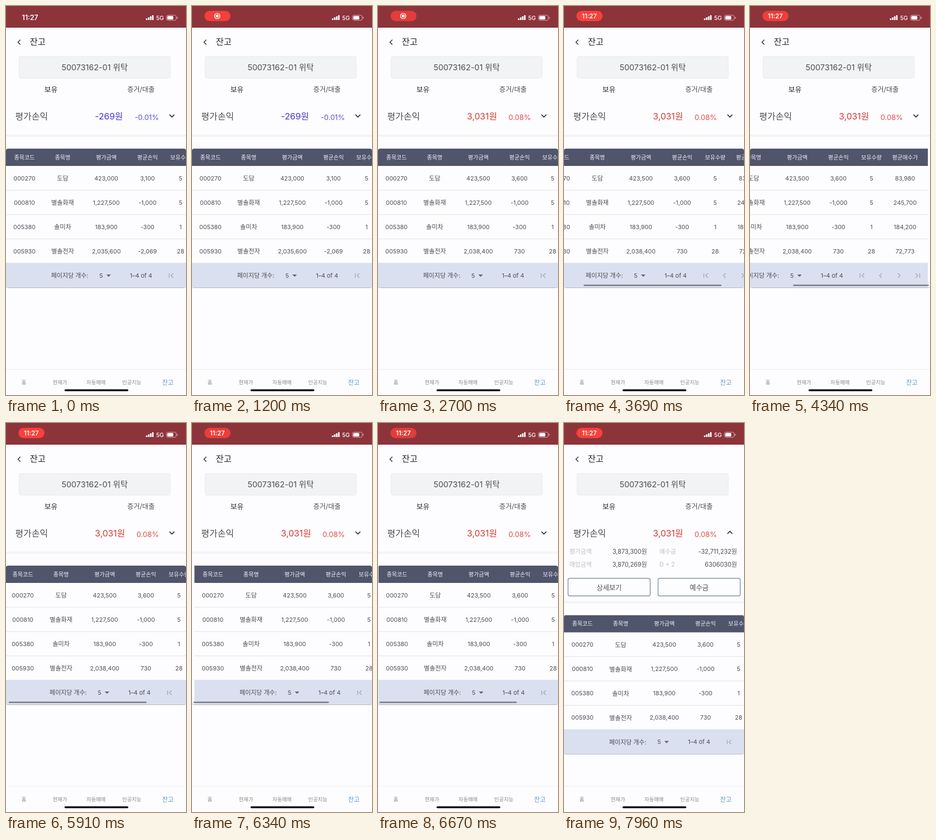
Animation, 332 px wide and 720 px high, one loop 7990 ms. Source, as an HTML page:

```html
<!DOCTYPE html>
<html lang="ko">
<head>
<meta charset="utf-8">
<style>
html, body { margin: 0; width: 100%; height: 100%; overflow: hidden; background: #fdfcfe; }
svg { display: block; width: 332px; height: 720px; }
text { font-family: Inter, "Noto Sans CJK KR", "Noto Sans CJK", sans-serif; white-space: pre; }
</style>
</head>
<body>
<svg id="stage" viewBox="0 0 332 720"></svg>
<script>
const LOOP = 7990;
const PAGE = '#fdfcfe', INK = '#4e4d54', DARK = '#25242a', MUTED = '#87868d', FAINT = '#bfbec6';
const BLUE = '#4039d0', RED = '#d63a36';

// Times in ms
const PILL_IN = 700, QUOTE = 1500, CLOCK_BACK = 3250;
const SCROLL = [[2950, 0], [3400, 16], [3690, 43], [4050, 83], [4340, 98], [4650, 94],
  [4950, 94], [5300, 60], [5650, 18], [5910, 3], [6150, -6], [6400, -4], [6670, -1], [6850, 0]];
const BAR_FADE = [[2950, 0], [3150, 1], [6950, 1], [7250, 0]];
const OPEN = [[7480, 0], [7780, 1]];
const OPEN_HEIGHT = 91.5;
const MAX_SCROLL = 94;
const PULSE = 1985;

const COLUMNS = [34, 104.5, 185, 261, 322, 384];
const HEADS = ['종목코드', '종목명', '평가금액', '평균손익', '보유수량', '평균매수가'];
const ROWS = [
  ['000270', '도담', '423,000', '3,100', '5', '83,980'],
  ['000810', '별솔화재', '1,227,500', '-1,000', '5', '245,700'],
  ['005380', '솔미차', '183,900', '-300', '1', '184,200'],
  ['005930', '별솔전자', '2,035,600', '-2,069', '28', '72,773']
];

// Text placed by its vertical centre
function label(str, x, y, size, fill = INK, anchor = 'middle', weight = 400, id = '') {
  return `<text id="${id}" x="${x}" y="${y + size * .36}" font-size="${size}" fill="${fill}" ` +
    `text-anchor="${anchor}" font-weight="${weight}">${str}</text>`;
}
const rect = (x, y, w, h, fill, rest = '') =>
  `<rect x="${x}" y="${y}" width="${w}" height="${h}" fill="${fill}" ${rest}/>`;
const line = (d, color, width = 1.4, rest = '') =>
  `<path d="${d}" fill="none" stroke="${color}" stroke-width="${width}" ${rest}/>`;

function statusBar() {
  const bars = [3, 5, 7, 9].map((h, i) => rect(258 + i * 3.8, 26 - h, 2.8, h, '#fff', 'rx=".8"')).join('');
  return rect(0, 0, 332, 40, '#8d343b') + rect(0, 39, 332, 1, '#7c1a22') +
    rect(23, 9, 48, 19, '#fa403a', 'rx="9.5" id="pill"') +
    label('11:27', 44.5, 21.5, 12.5, '#fff', 'middle', 600, 'clock') +
    '<g id="record"><circle cx="46.5" cy="18.5" r="5" fill="none" stroke="#fff" stroke-width="1.2"/>' +
    '<circle cx="46.5" cy="18.5" r="2.8" fill="#fff"/></g>' +
    bars + label('5G', 284, 22, 10.5, '#fff', 'middle', 500) +
    rect(296, 17, 18, 9.5, 'none', 'rx="2.8" stroke="#d3a9ad"') +
    rect(297.5, 18.5, 11, 6.5, '#fff', 'rx="1.5"') +
    rect(315.2, 20, 1.3, 3.5, '#d3a9ad', 'rx=".6"');
}

function summary() {
  return line('M26.5 62.5 L22 67 L26.5 71.5', DARK) +
    label('잔고', 44, 66.5, 15.7, DARK, 'start', 500) +
    rect(24, 93.5, 279, 40, '#f2f3f5', 'rx="3" stroke="#ebebe9"') +
    label('50073162-01 위탁', 163.5, 113.5, 14.8) +
    label('보유', 83, 154.5, 13, DARK, 'middle', 500) +
    label('증거/대출', 249, 154.5, 12.5) +
    label('평가손익', 17, 204, 16.4, INK, 'start') +
    label('', 164, 204, 16.2, RED, 'start', 400, 'profit') +
    label('', 282, 206, 13.3, RED, 'end', 400, 'rate') +
    line('M301.5 201 L306 205.5 L310.5 201', DARK, 1.7, 'id="chevron"');
}

function details() {
  const pair = (name, value, x, right, y) =>
    label(name, x, y, 11.2, FAINT, 'start') + label(value, right, y, 11.2, INK, 'end');
  const button = (name, x, w) =>
    rect(x, 287.5, w, 32.5, 'none', 'rx="3" stroke="#8290a8" stroke-width="1.4"') +
    label(name, x + w / 2, 304, 12.6);
  return pair('평가금액', '3,873,300원', 10, 153, 238) +
    pair('예수금', '-32,711,232원', 176, 319, 238) +
    pair('매입금액', '3,870,269원', 10, 153, 262) +
    pair('D + 2', '6306030원', 176, 319, 262) +
    button('상세보기', 7.5, 151.5) + button('예수금', 173.5, 151.5);
}

function table() {
  const heads = HEADS.map((h, i) => label(h, COLUMNS[i], 280, 10.3, '#f0f0f6', 'middle', 500)).join('');
  const rows = ROWS.map((cells, r) =>
    cells.map((c, i) => label(c, COLUMNS[i], 319 + r * 45, i === 1 ? 11.4 : 11, INK, 'middle', 400, `c${r}${i}`)).join('') +
    rect(0, 340.5 + r * 45, 426, 1, '#e5e1dc')).join('');
  const arrow = (x, dir) => `M${x + 2 * dir} 495 l${-4 * dir} 4 l${4 * dir} 4`;
  const pager = line(arrow(306.5, 1) + 'M301 495 v8' + arrow(339, 1) + arrow(373, -1) +
    arrow(405.5, -1) + 'M411 495 v8', '#a1a4b2', 1.3);
  return rect(0, 264, 426, 32, '#50556b') + heads + rows +
    rect(0, 476, 426, 45, '#dae0ef') +
    label('페이지당 개수:', 152, 499, 11.3, INK, 'end') +
    label('5', 175.5, 499, 11) + '<path d="M185 497 h8.5 l-4.2 4.3z" fill="#66666f"/>' +
    label('1–4 of 4', 249, 499, 11) + pager;
}

function navigation() {
  const tabs = [['홈', 33], ['현재가', 99.5], ['자동매매', 166], ['인공지능', 232]];
  return rect(0, 672, 332, 48, PAGE) + rect(0, 672, 332, 1, '#efeeef') +
    tabs.map(([name, x]) => label(name, x, 697, 9.6, MUTED)).join('') +
    label('잔고', 298.5, 697, 11.4, '#4f97cc', 'middle', 500) +
    rect(108, 709.5, 117.5, 3.5, '#000', 'rx="1.75"');
}

document.getElementById('stage').innerHTML =
  '<defs><clipPath id="paper"><rect y="264" width="332" height="257" rx="4"/></clipPath>' +
  '<clipPath id="fold"><rect id="foldArea" y="226" width="332" height="0"/></clipPath></defs>' +
  rect(0, 0, 332, 720, PAGE) + statusBar() + summary() +
  `<g clip-path="url(#fold)">${details()}</g>` +
  `<g id="lower">${rect(0, 238, 332, 4, '#f4f4f4')}` +
  rect(0, 265, 332, 257, '#b4b6bf', 'rx="4"') +
  `<g clip-path="url(#paper)">${rect(0, 264, 332, 257, PAGE)}<g id="cells">${table()}</g></g>` +
  rect(0, 515.8, 254, 2.4, '#777983', 'rx="1.2" id="bar"') + '</g>' +
  navigation();

const el = id => document.getElementById(id);
const set = (id, attrs) => {
  for (const name in attrs) el(id).setAttribute(name, attrs[name]);
};
const write = (id, str) => {
  if (el(id).textContent !== str) el(id).textContent = str;
};

function track(steps, t) {
  if (t <= steps[0][0]) return steps[0][1];
  for (let i = 1; i < steps.length; i++) {
    const [t0, a] = steps[i - 1], [t1, b] = steps[i];
    if (t <= t1) return a + (b - a) * (t - t0) / (t1 - t0);
  }
  return steps[steps.length - 1][1];
}

function drawStatus(t) {
  const on = t >= PILL_IN, recording = on && t < CLOCK_BACK;
  const glow = (1 - Math.cos((t - 2700) / PULSE * 2 * Math.PI)) / 2;
  set('pill', { opacity: on ? .78 + .22 * Math.min(1, glow * 1.6) : 0 });
  set('record', { opacity: recording ? 1 : 0 });
  set('clock', { opacity: recording ? 0 : 1, x: on ? 46.7 : 44.5, y: on ? 22.8 : 26, 'font-size': on ? 11.6 : 12.6 });
}

function drawQuotes(t) {
  const up = t >= QUOTE;
  write('profit', up ? '3,031원' : '-269원');
  write('rate', up ? '0.08%' : '-0.01%');
  set('profit', { fill: up ? RED : BLUE });
  set('rate', { fill: up ? '#dc504a' : '#5a54cc' });
  write('c02', up ? '423,500' : '423,000');
  write('c03', up ? '3,600' : '3,100');
  write('c32', up ? '2,038,400' : '2,035,600');
  write('c33', up ? '730' : '-2,069');
}

function drawTable(t) {
  const scroll = track(SCROLL, t);
  const inside = Math.max(0, Math.min(MAX_SCROLL, scroll));
  const over = scroll - inside;
  set('cells', { transform: `translate(${-scroll})` });
  set('bar', {
    x: 2.7 + inside * .775 + Math.max(0, over),
    width: 254.3 - Math.abs(over),
    opacity: track(BAR_FADE, t)
  });
  const p = track(OPEN, t), height = OPEN_HEIGHT * p * p * (3 - 2 * p);
  set('lower', { transform: `translate(0 ${height})` });
  set('foldArea', { height: height + 8 * p });
  set('chevron', { transform: `rotate(${180 * p} 306 203)` });
}

function frame(now) {
  const t = now % LOOP;
  drawStatus(t);
  drawQuotes(t);
  drawTable(t);
  requestAnimationFrame(() => frame(performance.now() - start));
}
const start = performance.now();
frame(0);
</script>
</body>
</html>
```
